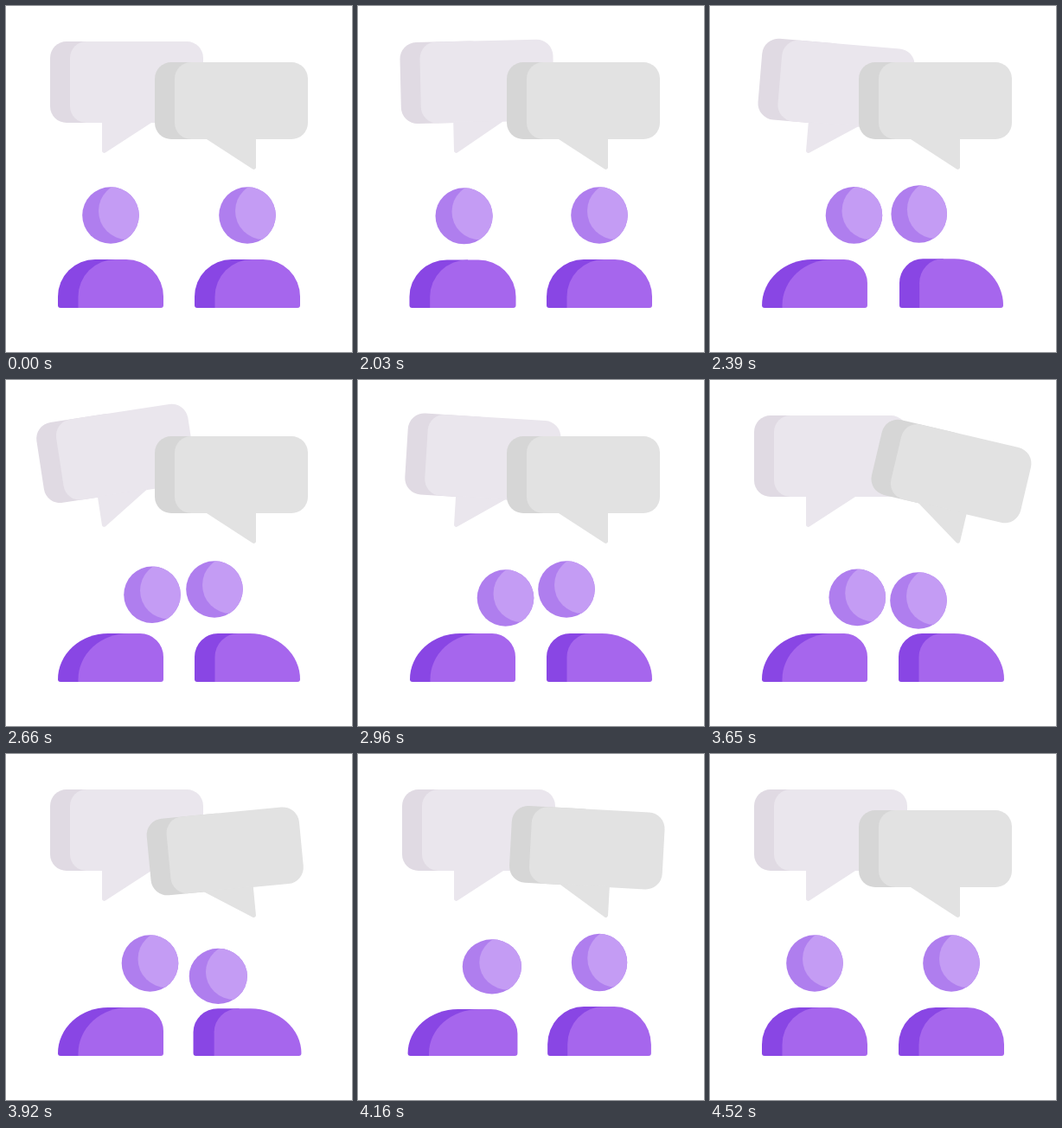
Write an HTML page with a canvas that moves like this. It is 400 px wide and 400 px high and loops after 4550 ms.

```html
<!DOCTYPE html>
<html lang="en">
<head>
<meta charset="utf-8">
<title>Conversation</title>
<style>
  html, body { margin: 0; width: 100%; height: 100%; overflow: hidden; background: #fff; }
  canvas { display: block; width: 100vw; height: 100vh; object-fit: contain; }
</style>
</head>
<body>
<canvas id="stage" width="400" height="400"></canvas>
<script>
const LOOP = 4550, FLOOR = 349;
const SWING_STEP = 229, MOVE_TIME = 310, HOP_TIME = 410;
const ctx = document.getElementById('stage').getContext('2d');

// go and back start the walk of the head; bow and rise start its nod.
const people = [
  { x: 121, lean: 45.5, nod: [4, 10], go: 1994, back: 4050, bow: 2480, rise: 3600 },
  { x: 279, lean: -38, nod: [0, 13], go: 2090, back: 3847, bow: 3280, rise: 3900 }
];

// swing lists the turning points in degrees, between two rests.
const bubbles = [
  { x: 51, y: 41, height: 94, tailSide: 'left', dark: '#e0dae3', light: '#eae6ed',
    start: 1993, swing: [0, -20, 9.5, -9, 4, 0] },
  { x: 172, y: 65, height: 89, tailSide: 'right', dark: '#d6d6d6', light: '#e2e2e2',
    start: 3149, swing: [0, -16, 15.5, -10, 5, 0] }
];

const clamp = u => Math.min(1, Math.max(0, u));
const mix = (a, b, u) => a + (b - a) * u;
const ease = u => (1 - Math.cos(Math.PI * clamp(u))) / 2;
const thereAndBack = (t, go, back) => ease((t - go) / MOVE_TIME) - ease((t - back) / MOVE_TIME);

// Squash first (positive), then a smaller stretch (negative).
function hop(t, start) {
  const u = clamp((t - start) / HOP_TIME) ** 1.6;
  return 1.3 * Math.sin(2 * Math.PI * u) * (1 - u);
}

function swingAngle({ start, swing }, t) {
  const u = Math.min(swing.length - 1.001, Math.max(0, (t - start) / SWING_STEP));
  const i = Math.floor(u);
  return mix(swing[i], swing[i + 1], ease(u - i)) * Math.PI / 180;
}

function box(color, x, y, w, h, radii) {
  ctx.fillStyle = color;
  ctx.beginPath();
  ctx.roundRect(x, y, w, h, radii);
  ctx.fill();
}

function disc(color, x, y, r) {
  ctx.fillStyle = color;
  ctx.beginPath();
  ctx.arc(x, y, r, 0, Math.PI * 2);
  ctx.fill();
}

function drawBubble(b, t) {
  const left = b.x + 60, right = b.x + 117, bottom = b.y + b.height;
  const onLeft = b.tailSide === 'left';
  const tipX = onLeft ? left : right, pivotX = tipX + (onLeft ? 2 : -2), pivotY = bottom + 33;
  ctx.save();
  ctx.translate(pivotX, pivotY);
  ctx.rotate(swingAngle(b, t));
  ctx.translate(-pivotX, -pivotY);
  box(b.dark, b.x, b.y, 100, b.height, 19);
  box(b.light, b.x + 23, b.y, 154, b.height, 19);
  ctx.beginPath();
  ctx.moveTo(left, bottom - 1);
  ctx.lineTo(left, bottom);
  ctx.arcTo(tipX, bottom + 37, right, bottom, 2.5);
  ctx.lineTo(right, bottom);
  ctx.lineTo(right, bottom - 1);
  ctx.fill();
  ctx.restore();
}

function drawBody(p, t) {
  const morph = thereAndBack(t, p.go + 30, p.back + 30);
  const outer = mix(43, 58, morph), inner = mix(43, 27, morph);
  const [left, right] = p.lean > 0 ? [outer, inner] : [inner, outer];
  const corner = r => ({ x: r, y: Math.min(r, 53) });
  box('#8946e4', -61, -56, left + 24, 56, [corner(left), 0, 0, 3]);
  box('#a666ed', -37.5, -56, 98.5, 56, [corner(left), corner(right), 3, 0]);
}

function drawHead(p, t) {
  const lean = thereAndBack(t, p.go, p.back);
  const bow = thereAndBack(t, p.bow, p.rise);
  ctx.translate(p.lean * lean + p.nod[0] * bow, p.nod[1] * bow - 107);
  disc('#af7eee', 0, 0, 32.8);
  ctx.clip();
  disc('#c49cf4', 19, -5, 33);
}

function drawPerson(p, t) {
  const squash = hop(t, p.go) + hop(t, p.back);
  ctx.save();
  ctx.translate(p.x, FLOOR);
  ctx.scale(1 + .05 * squash, 1 - .045 * squash);
  drawBody(p, t);
  drawHead(p, t);
  ctx.restore();
}

function draw() {
  const t = performance.now() % LOOP;
  ctx.fillStyle = '#fff';
  ctx.fillRect(0, 0, 400, 400);
  bubbles.forEach(b => drawBubble(b, t));
  people.forEach(p => drawPerson(p, t));
  requestAnimationFrame(draw);
}
draw();
</script>
</body>
</html>
```
